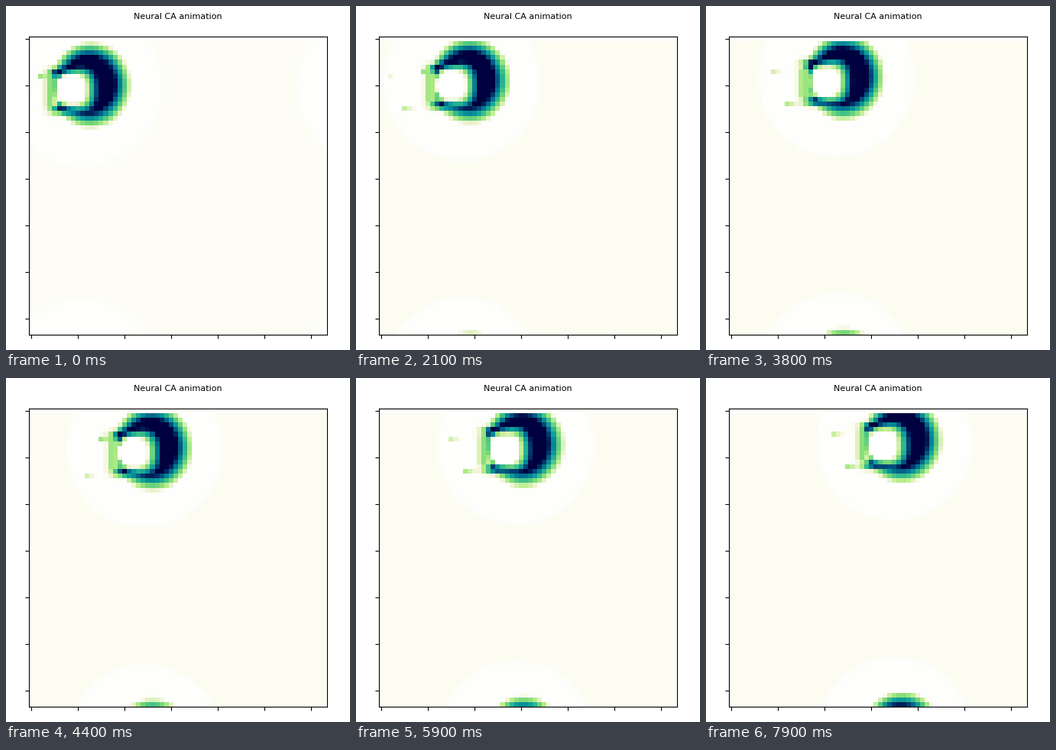
Write a matplotlib script that moves like this. It is 450 px wide and 450 px high and loops after 8000 ms.

```python
import numpy as np
import matplotlib.pyplot as plt
from matplotlib.animation import FuncAnimation
from matplotlib.colors import LinearSegmentedColormap

SIZE, PERIOD = 64, 63
FRAMES, INTERVAL = 80, 100
START = np.array([13.3, 10.45])
VELOCITY = np.array([3.03, -0.45])  # cells per second
RADII = (8.85, 9.45)
TAIL_GAP = 2.15  # seconds between shed tail cells

STOPS = [
    (0.00, (255, 255, 255)), (0.03, (252, 252, 240)), (0.10, (240, 243, 212)),
    (0.22, (184, 238, 138)), (0.35, (125, 217, 120)), (0.48, (55, 190, 138)),
    (0.60, (15, 160, 155)), (0.72, (0, 118, 148)), (0.85, (0, 65, 115)),
    (1.00, (0, 0, 62)),
]
CMAP = LinearSegmentedColormap.from_list(
    "pond", [(v, tuple(c / 255 for c in rgb)) for v, rgb in STOPS], N=1024)

ROWS, COLS = np.mgrid[0:SIZE, 0:SIZE] + 0.5


def wrap(d):
    return (d + PERIOD / 2) % PERIOD - PERIOD / 2


def bump(x, y, cx, cy, sx, sy):
    return np.exp(-((x - cx) / sx) ** 2 - ((y - cy) / sy) ** 2)


def creature(x, y):
    """Crescent with a squarish hole; x, y are offsets from its centre."""
    rho = np.hypot(x / RADII[0], y / RADII[1])
    r = np.hypot(x, y) + 1e-9
    outer = (1 - rho) * 9.2 / (3.4 + 0.5 * x / r + 0.2 * y / r)

    hx, hy = x + 4.2, y - 0.95
    rh = (abs(hx) ** 3 + abs(hy) ** 3) ** (1 / 3)
    slope = 1.8 + 1.2 * hx / (np.hypot(hx, hy) + 1e-9)
    inner = (rh - 2.95) / np.maximum(slope, 0.6)

    arms = 0.75 * (bump(x, y, -7.0, -2.8, 2.1, 0.95)
                   + bump(x, y, -6.7, 5.2, 2.1, 0.95))
    strip = 0.32 * np.exp(-((x + 8.7) / 1.1) ** 2) * (abs(y - 1.2) < 3.4)
    body = np.maximum(np.maximum(outer, 0) + arms, strip)
    return np.clip(np.minimum(body, inner), 0, 1)


def shed_tail(field, t, first, col, row):
    """Cells left behind each time an arm steps up one row."""
    for k in range(-1, 5):
        age = t - first - TAIL_GAP * k
        if not -0.4 <= age < 2.1:
            continue
        c = int(round(col + TAIL_GAP * VELOCITY[0] * k))
        for j in range(4):
            value = 0.28 - 0.07 * j - 0.05 * max(age, 0) ** 2
            if c + j > 0:
                field[row - k, c + j] = max(field[row - k, c + j], value)


def state(i):
    t = i * INTERVAL / 1000
    cx, cy = START + VELOCITY * t
    x, y = wrap(COLS - cx), wrap(ROWS - cy)

    floor = 0.02 + 0.01 * min(t / 1.3, 1)
    halo = np.clip((np.hypot(x + 1.8, y - 0.3) - 16) / 2, 0, 1)
    field = 0.005 + (floor - 0.005) * halo

    body = creature(x, y)
    hole = np.hypot(x + 4.2, y - 0.95) < 3.2
    field[hole] = 0
    field = np.maximum(field, body)
    shed_tail(field, t, 0.1, 2.3, 8)
    shed_tail(field, t, 0.7, 5.0, 15)

    field[0, :] = 0.005
    field[:, 0] = np.minimum(field[:, 0], 0.03)
    return field


fig = plt.figure(figsize=(4.5, 4.5), dpi=100, facecolor="white")
fig.suptitle("Neural CA animation", fontsize=8, family="DejaVu Sans")
ax = fig.add_axes([30 / 450, 20 / 450, 390 / 450, 390 / 450])
image = ax.imshow(state(0), cmap=CMAP, vmin=0, vmax=1, interpolation="nearest")
ax.set_xticks(range(0, SIZE, 10), labels=[])
ax.set_yticks(range(0, SIZE, 10), labels=[])


def update(i):
    image.set_data(state(i))
    return [image]


anim = FuncAnimation(fig, update, frames=FRAMES, interval=INTERVAL, repeat=True)
plt.show()
```
